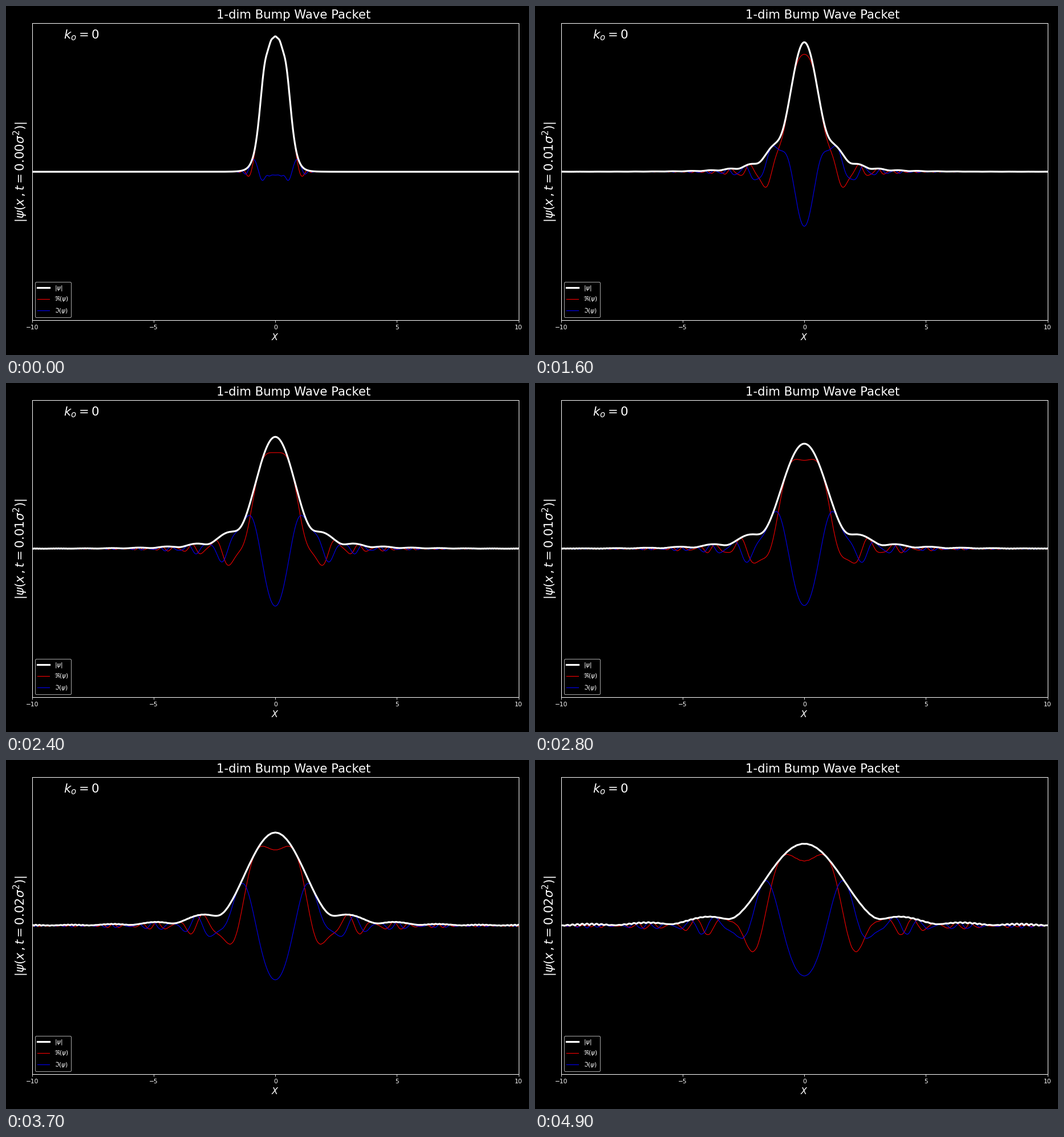
Animation of 917x611 px, one loop 5000 ms. Source, as a matplotlib script:

```python
import numpy as np
import matplotlib.pyplot as plt
from matplotlib.animation import FuncAnimation

WIDTH, HEIGHT, DPI = 917, 611, 76.4
FRAMES, INTERVAL = 50, 100
HALF_BOX = 10.0
POINTS = 2048
STEP = 0.0121             # physical time per frame
LABEL_STEP = 0.02 / 51    # the same time in units of sigma squared

plt.style.use("dark_background")
plt.rcParams["font.family"] = "DejaVu Sans"
plt.rcParams["mathtext.fontset"] = "dejavusans"
plt.rcParams["axes.linewidth"] = 0.95


def bump(x):
    """Smooth bump of unit height supported on (-1, 1)."""
    y = np.zeros_like(x)
    inside = np.abs(x) < 1
    y[inside] = np.exp(1 - 1 / (1 - x[inside] ** 2))
    return y


grid = np.linspace(-HALF_BOX, HALF_BOX, POINTS + 1)
spectrum = np.fft.fft(bump(grid[:-1]))
wave_numbers = 2 * np.pi * np.fft.fftfreq(POINTS, 2 * HALF_BOX / POINTS)


def evolve(t):
    """Free evolution of the packet in a periodic box."""
    psi = np.fft.ifft(spectrum * np.exp(-0.5j * wave_numbers ** 2 * t))
    return np.append(psi, psi[0])


def label(t):
    return rf"$|\psi(x\,,t={t:.2f}\sigma^2)|$"


fig = plt.figure(figsize=((WIDTH + 1e-6) / DPI, (HEIGHT + 1e-6) / DPI),
                 dpi=DPI, facecolor="black")
ax = fig.add_axes([45.7 / WIDTH, 60.8 / HEIGHT, 853 / WIDTH, 520 / HEIGHT],
                  facecolor="black")
ax.set_xlim(-HALF_BOX, HALF_BOX)
ax.set_ylim(-1.1, 1.1)
ax.set_xticks([-10, -5, 0, 5, 10])
ax.set_yticks([])
ax.set_xlabel("$X$", fontsize=15)
ax.set_ylabel(label(0), fontsize=20)
ax.text(-8.7, 0.983, "$k_o = 0$", fontsize=20)
fig.text(504.5 / WIDTH, 1 - 22 / HEIGHT, "1-dim Bump Wave Packet",
         fontsize=20, ha="center", va="baseline")

modulus, = ax.plot([], [], color="white", lw=3, zorder=3, label=r"$|\psi|$")
real, = ax.plot([], [], color="red", lw=1, label=r"$\Re(\psi)$")
imag, = ax.plot([], [], color="blue", lw=1, label=r"$\Im(\psi)$")
ax.legend(loc="lower left", fontsize=10)


def update(frame):
    steps = frame + 2
    psi = evolve(steps * STEP)
    modulus.set_data(grid, np.abs(psi))
    real.set_data(grid, psi.real)
    imag.set_data(grid, psi.imag)
    ax.yaxis.label.set_text(label(steps * LABEL_STEP))
    return modulus, real, imag, ax.yaxis.label


animation = FuncAnimation(fig, update, frames=FRAMES, interval=INTERVAL,
                          repeat=True, repeat_delay=0, blit=False)
plt.show()
```
